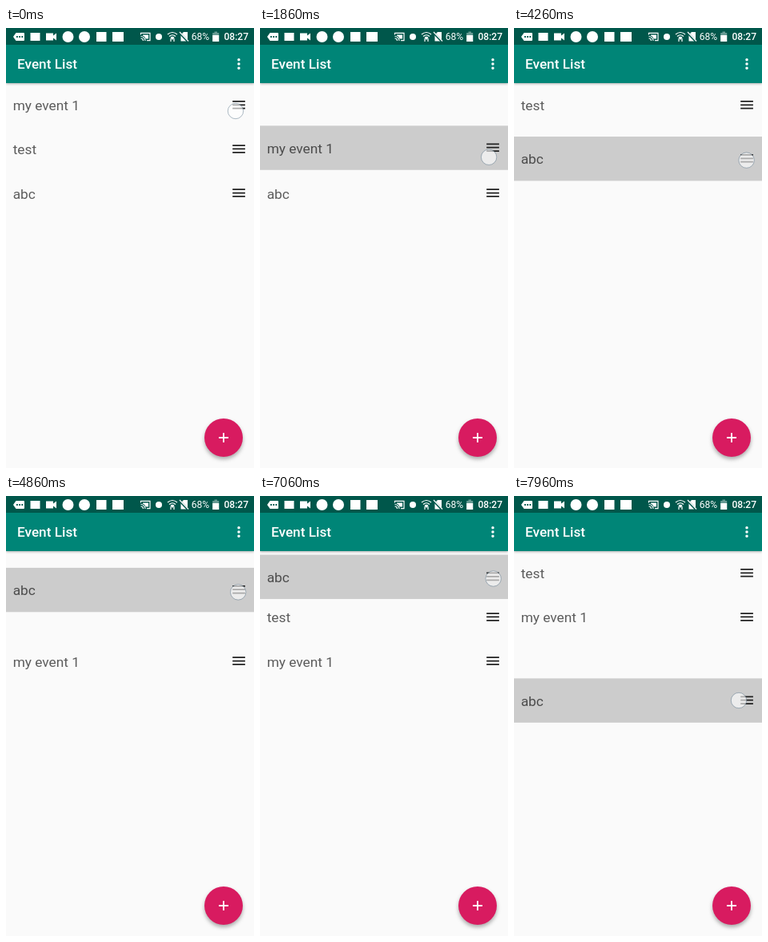
An HTML page for the animation above (8000 ms loop, 310 by 551 pixels).

```html
<!DOCTYPE html>
<html lang="en">
<head>
<meta charset="utf-8">
<title>Event List</title>
<style>
  html, body { margin: 0; width: 100%; height: 100%; overflow: hidden; background: #fafafa; }
  svg { display: block; width: 100%; height: 100%; font-family: Roboto, sans-serif; }
  .row text { font-size: 17.3px; fill: rgba(0, 0, 0, .63); }
  .row path { stroke: #202020; stroke-width: 1.75; }
  .row rect { fill: #ccc; }
  .bar { filter: drop-shadow(0 1.5px 1.5px rgba(0, 0, 0, .3)); }
  .fab { filter: drop-shadow(0 3px 2.5px rgba(0, 0, 0, .32)); }
  .line { fill: none; stroke: #fff; stroke-width: 1.2; }
</style>
</head>
<body>
<svg viewBox="0 0 310 551">
  <rect width="310" height="551" fill="#fafafa"/>
  <g id="list"></g>

  <rect class="bar" width="310" height="69" fill="#008577"/>
  <rect width="310" height="21" fill="#00574b"/>
  <text x="14" y="51.4" font-size="17.2" font-weight="500" fill="#fff">Event List</text>
  <path d="M291 39.8v0m0 5.2v0m0 5.200v0" stroke="#fff" stroke-width="3.5" stroke-linecap="round"/>

  <!-- status bar -->
  <g fill="#fff">
    <path d="M9 11 12.500 6H22q1 0 1 1v8q0 1-1 1H12.500Z"/>
    <path d="M13 11h1.800m1.400 0h1.800m1.400 0h1.800" stroke="#00574b" stroke-width="1.8"/>
    <rect x="30.500" y="6" width="12" height="10"/>
    <path d="M50 6.500h9v3l4-3v9l-4-3v3h-9z"/>
    <circle cx="77.500" cy="11" r="7"/>
    <circle cx="98" cy="11" r="7"/>
    <rect x="113" y="5" width="12.500" height="12"/>
    <rect x="133" y="5" width="14" height="12"/>
    <path class="line" d="M168.500 8.500V6.300h11.500v9.400h-4M168.500 10.500a5.500 5.500 0 0 1 5.500 5.500M168.500 13a3 3 0 0 1 3 3"/>
    <path d="M171 8.500h7v5h-3.500q-.5-3-3.500-4z"/>
    <circle cx="191" cy="11" r="4"/>
    <path class="line" d="M202 8q6-5 12 0M204 10.500q4-3.500 8 0M206 13v4m4-4v4"/>
    <path d="M205.500 11.800q2.500-2 5 0L208 15z"/>
    <path d="M227 5v11.500h-8.500v-8l3.500-3.500z"/>
    <path d="M216.500 5.500 227.500 17" stroke="#00574b" stroke-width="2.6"/>
    <path class="line" d="M217 5 228 16.500"/>
    <text x="231.700" y="15.300" font-size="12.1">68%</text>
    <path d="M260.500 4.500h3.500v1.500h2.200v11h-8v-11h2.300z" opacity=".4"/>
    <path d="M258.200 9h8v8h-8z"/>
    <text x="272.400" y="15.300" font-size="12.1" font-weight="500">08:27</text>
  </g>

  <circle class="fab" cx="272" cy="513" r="24" fill="#d81b60"/>
  <path d="M266 513h12M272 507v12" stroke="#fff" stroke-width="1.8"/>
  <circle id="touch" r="9.7" fill="rgba(255,255,255,.62)" stroke="rgba(95,120,140,.5)"/>
</svg>

<script>
const LOOP = 8000, SETTLE = 250;
const slot = i => 69 + 55.1 * i;
const easeOut = p => p * (2 - p);
const smooth = p => p * p * (3 - 2 * p);
const mix = (a, b, p) => a + (b - a) * p;

const labels = ["test", "my event 1", "abc"];  // bottom to top
const order = [1, 0, 2];                       // row in each slot

// press: finger down, lift: row turns grey, move..move + time: drag, drop: finger up
const drags = [
  { press: 0, lift: 1260, move: 1160, time: 1083, drop: 2260, ease: easeOut,
    slot: 0, end: 130, finger: [287, 104, 286, 170] },
  { press: 2960, lift: 3790, move: 3860, time: 1928, drop: 5860, ease: easeOut,
    slot: 2, end: 63, finger: [291, 208, 290, 94] },
  { press: 6260, lift: 7060, move: 6970, time: 890, drop: LOOP, ease: smooth,
    slot: 0, end: 228.4, finger: [292, 99, 281, 256] },
];

const progress = (m, t) => m.ease(Math.min(1, Math.max(0, (t - m.move) / m.time)));
const place = (m, t) => mix(m.from, m.to, progress(m, t));
const moves = labels.map(() => []);

function addMove(row, move, time, from, to, ease = smooth) {
  const m = { move, time, from, to, ease };
  moves[row].push(m);
  return m;
}

order.forEach((row, i) => addMove(row, -1, 1, slot(i), slot(i)));

// a row passed by the dragged one slides into the free slot
for (const d of drags) {
  d.row = order[d.slot];
  const drag = addMove(d.row, d.move, d.time, slot(d.slot), d.end, d.ease);
  const dir = Math.sign(d.end - slot(d.slot));
  let t = d.move, free = d.slot;
  while (dir * (d.end - slot(free + dir)) > 0) {
    const next = free + dir;
    while (dir * (place(drag, t) - slot(next)) < 0) t += 10;
    addMove(order[next], t, SETTLE, slot(next), slot(free));
    order[free] = order[next];
    free = next;
  }
  order[free] = d.row;
  addMove(d.row, d.drop, SETTLE, d.end, slot(free));
}

const list = document.getElementById("list");
const touch = document.getElementById("touch");

list.innerHTML = labels.map(label => `<g class="row">
  <rect width="310" height="55.4"/>
  <text x="8.7" y="34.4">${label}</text>
  <path d="M283.200 22.900h15.700m-15.700 4.400h15.700m-15.700 4.400h15.700"/>
</g>`).join("");
const rows = [...list.children];

function draw(ms) {
  // the screen refreshes ten times a second
  const t = Math.max(0, Math.floor((ms - 60) / 100) * 100 + 60);
  rows.forEach((el, row) => {
    const current = moves[row].filter(m => m.move <= t).pop();
    const lifted = drags.some(d => d.row === row && ms >= d.lift && t < d.drop + SETTLE);
    el.setAttribute("transform", `translate(0 ${place(current, t)})`);
    el.firstElementChild.style.opacity = lifted ? 1 : 0;
  });
  const d = drags.find(d => t >= d.press && t <= d.drop);
  touch.style.display = d ? "" : "none";
  if (d) {
    const [x0, y0, x1, y1] = d.finger, p = progress(d, t);
    touch.setAttribute("cx", mix(x0, x1, p));
    touch.setAttribute("cy", mix(y0, y1, p));
  }
}

const start = performance.now();
function tick() {
  draw((performance.now() - start) % LOOP);
  requestAnimationFrame(tick);
}
tick();
</script>
</body>
</html>
```
